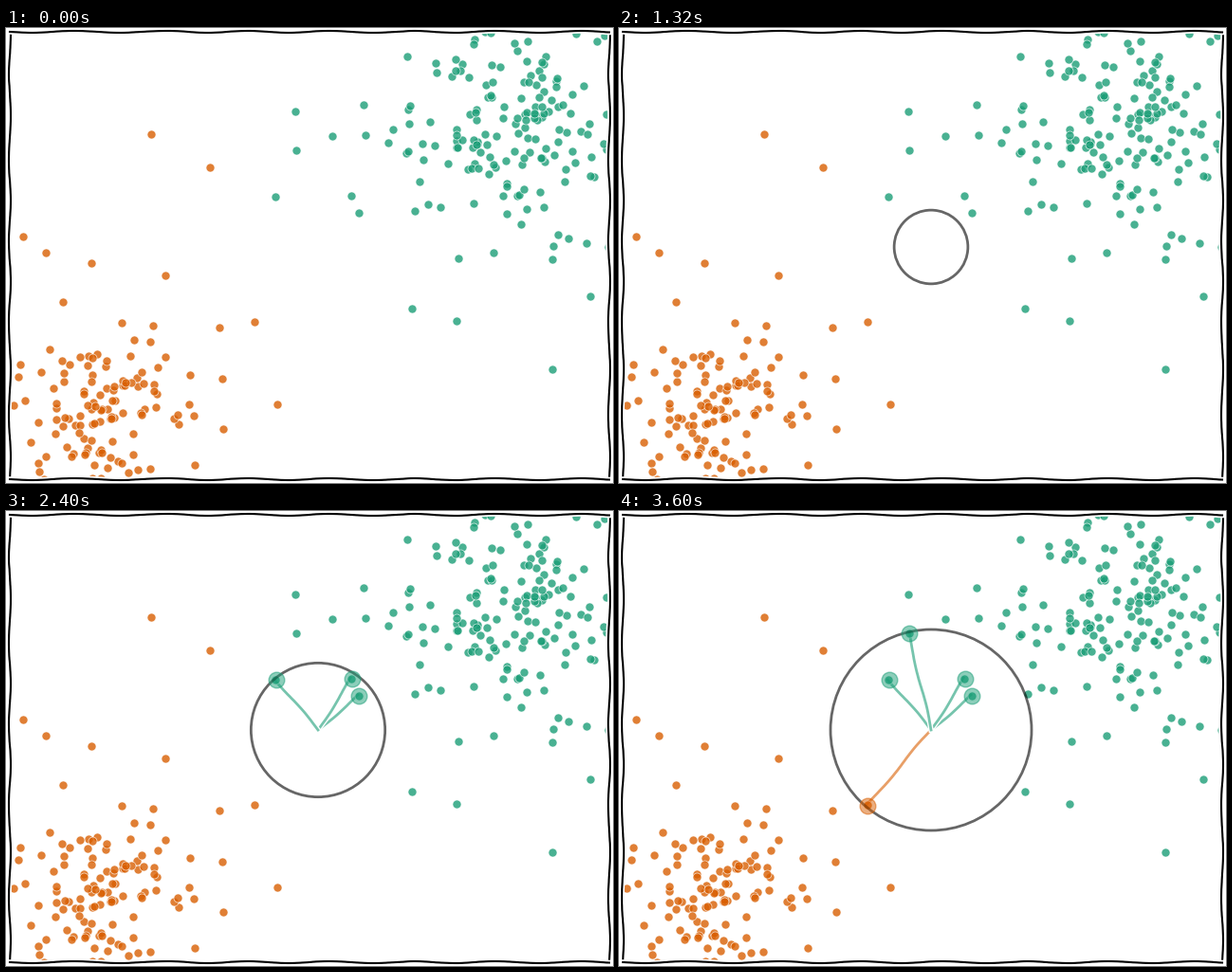
These frames come from a looping animation (640x480 px, 5400 ms). A matplotlib script:

```python
import numpy as np
import matplotlib.pyplot as plt
from matplotlib.animation import FuncAnimation
from matplotlib.patches import Circle

W, H, DPI = 640, 480, 100
PAD = 4
GREEN, ORANGE = "#1b9e77", "#d95f02"
CENTER = np.array([329.0, 231.0])
FRAMES, GROW_FRAMES, INTERVAL = 180, 120, 30
FINAL_RADIUS = 106

rng = np.random.default_rng(11)


def distance(points):
    return np.hypot(*(points - CENTER).T)


def cloud(count, mean, spread, low, high):
    """Normal samples kept inside a box and away from the growing circle."""
    points = rng.normal(mean, spread, (count * 8, 2))
    inside = np.all((points > low) & (points < high), axis=1)
    clear = distance(points) > FINAL_RADIUS + 12
    return points[inside & clear][:count]


# A few lone points around each cluster; the rest is sampled.
green_lone = [(284, 177.5), (364, 176.5), (371.5, 194.5), (305, 88),
              (305.5, 128.5), (344, 114), (379, 112.5), (377, 81),
              (403, 121), (431, 193), (427.5, 296), (474.5, 308.5),
              (576, 359.5)]
orange_lone = [(152.5, 111.5), (215, 147), (18, 219.5), (41.5, 237),
               (89.5, 248), (167.5, 261), (261.5, 310), (225, 316),
               (228, 369.5), (286, 396.5), (228.5, 423), (199, 461)]

groups = [
    (GREEN, np.vstack([green_lone, cloud(156, (526, 98), (68, 72),
                                         (408, 3), (637, 300))])),
    (ORANGE, np.vstack([orange_lone, cloud(114, (94, 400), (52, 60),
                                           (3, 262), (200, 477))])),
]

with plt.xkcd():
    fig = plt.figure(figsize=(W / DPI, H / DPI), dpi=DPI, facecolor="white")
    ax = fig.add_axes([PAD / W, PAD / H, 1 - 2 * PAD / W, 1 - 2 * PAD / H])
    ax.set(xlim=(PAD, W - PAD), ylim=(H - PAD, PAD), xticks=[], yticks=[])

for color, points in groups:
    ax.scatter(*points.T, s=42, c=color, alpha=0.8, edgecolors="white",
               linewidths=0.5, zorder=1)

ring = ax.add_patch(Circle(CENTER, 0, fill=False, ec="black", lw=2,
                           alpha=0.6, zorder=2))


def add_neighbor(point, color):
    with plt.xkcd():
        link, = ax.plot(*zip(CENTER, point), color=color, lw=2, alpha=0.6,
                        zorder=0.9)
    halo, = ax.plot(*(point + 0.5), "o", color=color, ms=12, alpha=0.5,
                    zorder=3)
    return link, halo


near = sorted((dist, color, tuple(point))
              for color, points in groups
              for dist, point in zip(distance(points), points)
              if dist < FINAL_RADIUS)
neighbors = [(dist, add_neighbor(np.array(point), color))
             for dist, color, point in near]


def update(frame):
    radius = FINAL_RADIUS * min(frame / GROW_FRAMES, 1)
    ring.set_radius(radius)
    ring.set_visible(radius > 0)
    artists = [ring]
    for dist, parts in neighbors:
        for part in parts:
            part.set_visible(dist < radius)
            artists.append(part)
    return artists


anim = FuncAnimation(fig, update, frames=FRAMES, interval=INTERVAL,
                     init_func=lambda: update(0), repeat=True, repeat_delay=0)
plt.show()
```
